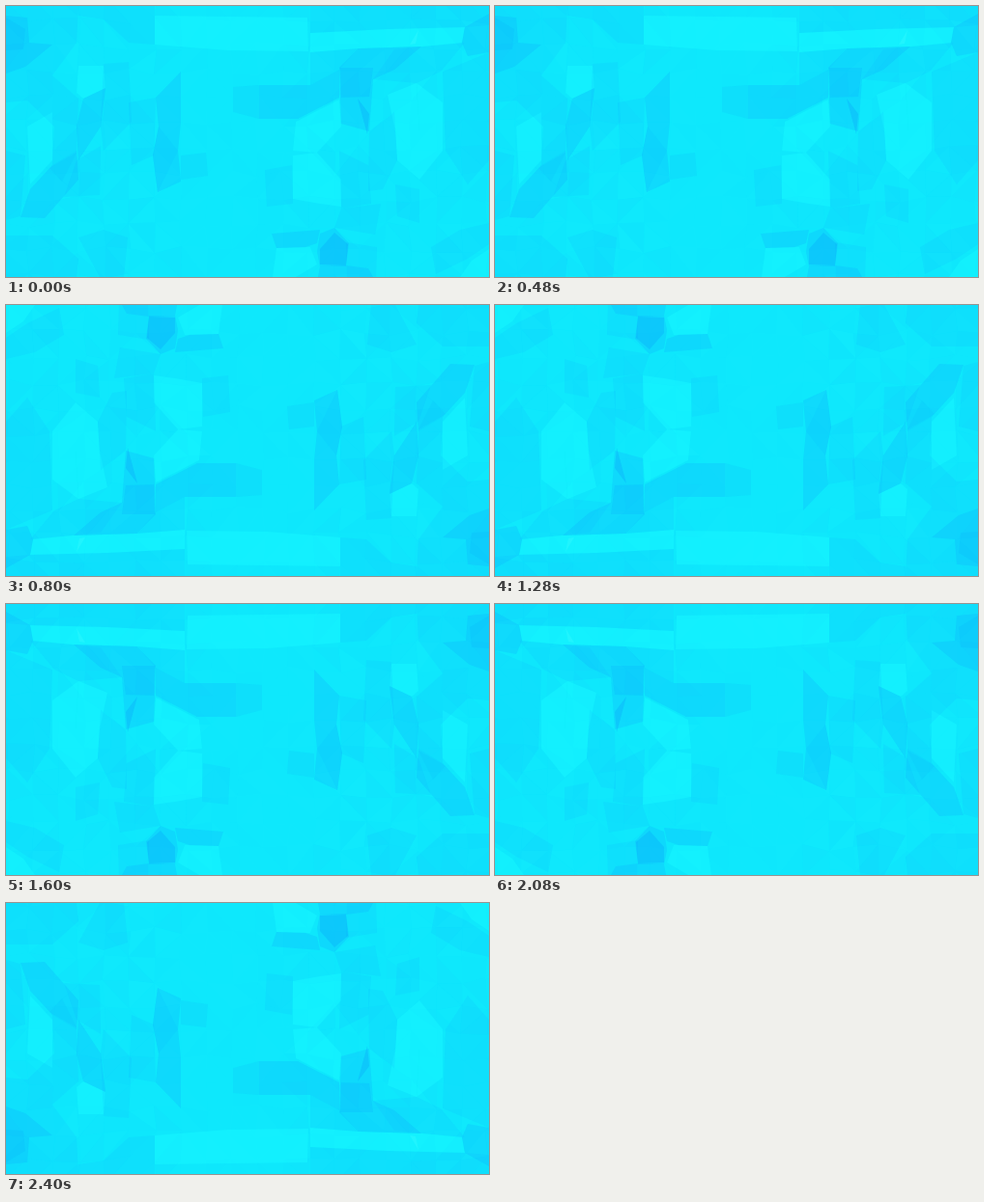
Write an HTML page that moves like this. It is 500x281 px and loops after 3.2 s.

```html
<!DOCTYPE html>
<html lang="en">
<head>
<meta charset="utf-8">
<title>Cyan facets</title>
<style>
  html, body { margin: 0; height: 100%; overflow: hidden; background: #0fe8fc; }
  svg { display: block; width: 100vw; height: 100vh; }
  .light { fill: #18faff; fill-opacity: .42; }
  .haze { fill: #10a6f8; fill-opacity: .12; }
  .mid { fill: #10a6f8; fill-opacity: .22; }
  .deep { fill: #0a98f6; fill-opacity: .26; }
</style>
</head>
<body>
<svg id="scene" viewBox="0 0 500 281" preserveAspectRatio="none">
  <rect width="500" height="281" fill="#0fe8fc"/>
  <g id="facets"></g>

  <g class="light">
    <path d="M154 10L230 11 230 46 154 40Z"/>
    <path d="M230 11L312 12 313 47 230 46Z"/>
    <path d="M315 28L395 24 475 22 472 38 430 42 365 44 315 48Z"/>
    <path d="M75 62L101 62 103 85 80 96 73 90Z"/>
    <path d="M300 120L345 97 347 125 322 152 297 150Z"/>
    <path d="M297 155L322 152 347 180 347 208 325 205 297 200Z"/>
    <path d="M395 92L425 80 428 130 403 130Z"/>
    <path d="M425 80L452 100 452 150 428 180 428 130Z"/>
    <path d="M403 130L428 130 428 180 405 160Z"/>
    <path d="M280 251L315 250 322 268 300 281 276 281Z"/>
    <path d="M22 125L48 110 48 160 25 185Z"/>
    <path d="M470 281L482 264 500 252V281Z"/>
  </g>

  <g class="haze">
    <path d="M0 0H75L73 38 48 72 22 98 0 100Z"/>
    <path d="M75 0H154V40L127 38 101 14 75 10Z"/>
    <path d="M22 98L48 72 75 96 73 150 48 165 50 125Z"/>
    <path d="M0 150L20 155 15 218 0 222Z"/>
    <path d="M101 60L127 58 130 120 101 150 98 125Z"/>
    <path d="M73 160L98 145 97 196 60 198Z"/>
    <path d="M127 100L155 95 153 155 130 165Z"/>
    <path d="M181 155L207 152 209 176 181 180Z"/>
    <path d="M235 84L262 82 262 117 235 110Z"/>
    <path d="M315 0H500V20L475 22 395 24 315 28Z"/>
    <path d="M315 48L365 44 345 66 315 82Z"/>
    <path d="M376 130L402 110 405 160 390 190 375 192Z"/>
    <path d="M345 150L375 165 378 205 347 210Z"/>
    <path d="M347 210L388 205 382 237 340 230Z"/>
    <path d="M402 45L475 38 450 68 425 80 380 76Z"/>
    <path d="M452 68L500 48V160L478 185 455 150Z"/>
    <path d="M403 185L428 190 428 225 405 218Z"/>
    <path d="M440 250L470 232 500 225V247L478 262 445 278Z"/>
    <path d="M0 238L48 238 75 262 73 281H0Z"/>
    <path d="M75 240L101 232 126 240 122 281H97Z"/>
    <path d="M268 170L296 165 297 205 270 208Z"/>
    <path d="M352 245L384 250 383 281H353Z"/>
  </g>

  <g class="mid">
    <path d="M0 10L22 12 24 38 48 40 20 63 0 70Z"/>
    <path d="M80 96L103 85 98 125 75 160 73 125Z"/>
    <path d="M73 150L75 180 40 220 15 219 25 190 48 165Z"/>
    <path d="M155 95L181 68 181 120 178 150 181 182 157 193 152 155 158 125Z"/>
    <path d="M262 82L315 82 345 66 345 95 302 117 262 117Z"/>
    <path d="M345 64L365 44 430 42 402 66 380 76 376 130 347 122Z"/>
    <path d="M475 22L500 8V48L478 52 472 38Z"/>
    <path d="M275 236L325 232 322 246 310 250 280 251Z"/>
    <path d="M325 236L340 230 355 246 352 270 325 270 322 255Z"/>
    <path d="M325 270L352 269 375 272 380 281H323Z"/>
  </g>

  <g class="deep">
    <path d="M325 252L340 235 354 247 352 269 325 268Z"/>
    <path d="M346 64L380 64 376 94 347 95Z" opacity=".6"/>
    <path d="M364 96L376 112 374 133Z"/>
    <path d="M45 168L73 152 58 182Z" opacity=".3"/>
    <path d="M158 125L178 150 157 193 152 155Z" opacity=".3"/>
    <path d="M0 12L20 24 18 45 0 46Z" opacity=".4"/>
  </g>
  <path d="M418 40L427 25 424 39Z" fill="#35faff" opacity=".4"/>
</svg>

<script>
const scene = document.getElementById('scene');
const CELL = 26.4, COLS = 20, ROWS = 12;

let seed = 7;
const random = () => (seed = seed * 16807 % 2147483647) / 2147483647;

// Faint triangles on a jittered grid
const grid = Array.from({ length: ROWS + 1 }, (_, row) =>
  Array.from({ length: COLS + 1 }, (_, col) => [
    col * CELL - 6 + random() * 4,
    row * CELL - 15 + random() * 8
  ]));

function triangle(...points) {
  const centre = points.reduce((sum, p) => sum + p[0], 0) / 3;
  const calm = centre > 185 && centre < 295 ? .3 : 1;
  const fill = random() < .5 ? '#10b4fa' : '#1cfcff';
  return `<path d="M${points.join('L')}Z" fill="${fill}" opacity="${random() * .06 * calm}"/>`;
}

let markup = '';
for (let row = 0; row < ROWS; row++) {
  for (let col = 0; col < COLS; col++) {
    const [a, b] = grid[row].slice(col, col + 2);
    const [c, d] = grid[row + 1].slice(col, col + 2);
    markup += random() < .5
      ? triangle(a, b, c) + triangle(b, c, d)
      : triangle(a, b, d) + triangle(a, c, d);
  }
}
document.getElementById('facets').innerHTML = markup;

// The same surface is mirrored with a hard cut every 800 ms
const FLIPS = ['1, 1', '-1, -1', '-1, 1', '1, -1'];
const start = performance.now();

function draw() {
  const step = Math.floor((performance.now() - start) / 800) % FLIPS.length;
  scene.style.transform = `scale(${FLIPS[step]})`;
  requestAnimationFrame(draw);
}
draw();
</script>
</body>
</html>
```
